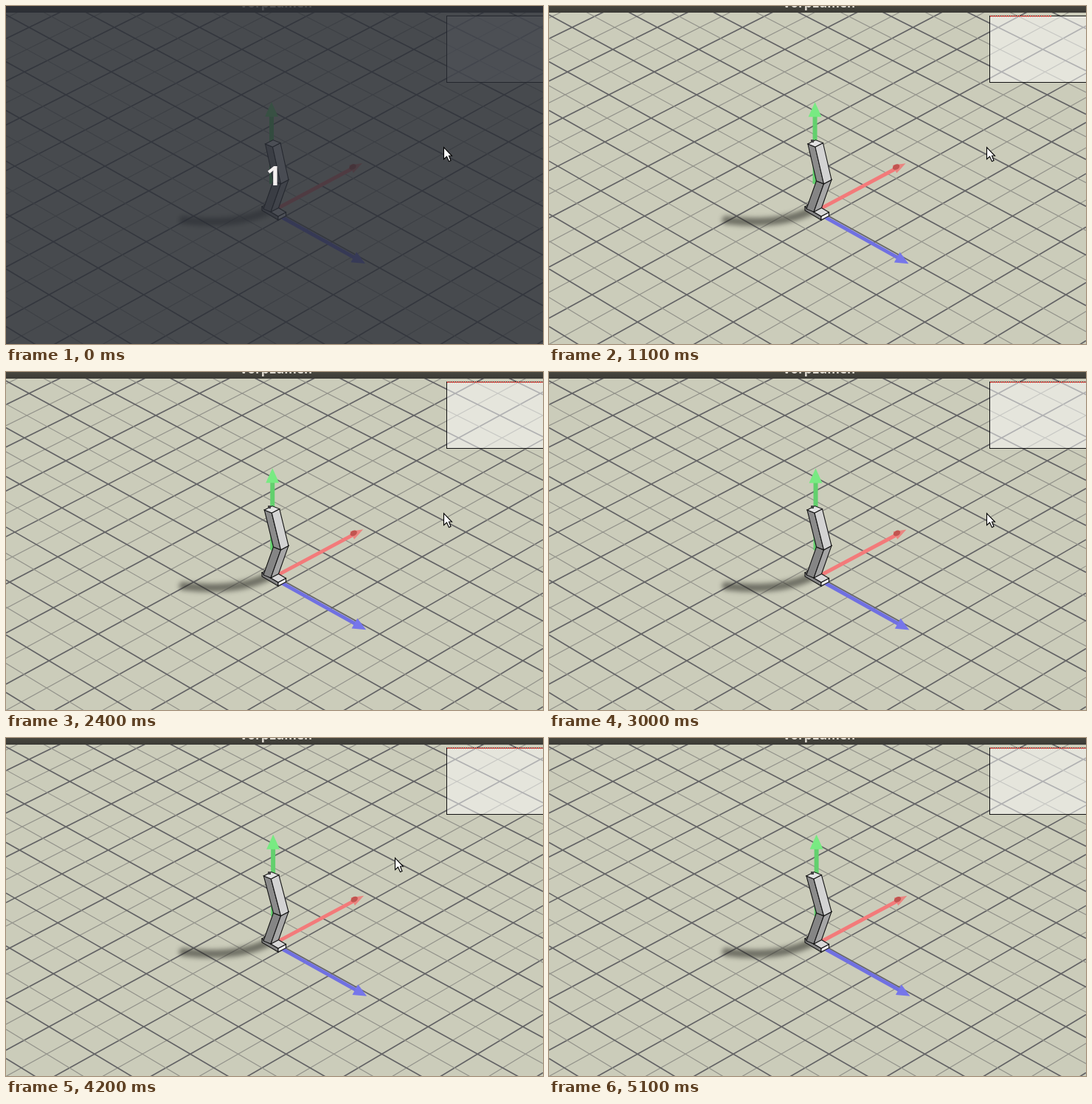
Write an HTML page with a canvas that moves like this. It is 728x458 px and loops after 5.2 s.

```html
<!DOCTYPE html>
<html>
<head>
<meta charset="utf-8">
<style>
  html, body { margin: 0; width: 100%; height: 100%; overflow: hidden; background: #cbccba; }
  canvas { display: block; }
</style>
</head>
<body>
<canvas id="stage" width="728" height="458"></canvas>
<script>
const W = 728, H = 458, LOOP = 5200, STEP = 100;
const HORIZON = -3200, VANISH = 6300;
const ctx = document.getElementById('stage').getContext('2d');
const add = (p, q) => [p[0] + q[0], p[1] + q[1]];

function path(points) {
  ctx.beginPath();
  for (const p of points) ctx.lineTo(...p);
}

function line(color, width, ...points) {
  path(points);
  ctx.strokeStyle = color;
  ctx.lineWidth = width;
  ctx.stroke();
}

function shape(fill, points, edge) {
  path(points);
  ctx.closePath();
  ctx.fillStyle = fill;
  ctx.fill();
  if (!edge) return;
  ctx.strokeStyle = edge;
  ctx.lineWidth = 1.1;
  ctx.stroke();
}

// Evenly spaced parallel ground lines in perspective; every second one is strong.
function gridLines(side, middle) {
  for (let n = -18; n <= 18; n++) {
    const y = HORIZON + 1 / (1 / (middle - HORIZON) - n * 2.84e-6);
    const rise = side * (y - HORIZON) / VANISH * W / 2;
    const strong = n % 2 === 0;
    line(strong ? '#636365' : '#93938b', strong ? 1.7 : 1.2, [0, y + rise], [W, y - rise]);
  }
}

function ground() {
  ctx.fillStyle = '#cbccba';
  ctx.fillRect(0, 0, W, H);
  gridLines(1, 225);
  gridLines(-1, 209);
}

function shadow() {
  ctx.save();
  ctx.filter = 'blur(3px)';
  ctx.lineCap = 'round';
  ctx.beginPath();
  ctx.moveTo(240, 290);
  ctx.quadraticCurveTo(312, 299, 358, 276);
  ctx.strokeStyle = 'rgba(35,35,30,.55)';
  ctx.lineWidth = 11;
  ctx.stroke();
  ctx.restore();
}

function arrow(from, to, width, headLength, headWidth, shaft, head) {
  const dx = to[0] - from[0], dy = to[1] - from[1], length = Math.hypot(dx, dy);
  ctx.save();
  ctx.translate(...from);
  ctx.rotate(Math.atan2(dy, dx));
  const neck = length - headLength;
  line(shaft, width, [0, 0], [neck + 1, 0]);
  shape(head, [[neck, -headWidth / 2], [length, 0], [neck, headWidth / 2]]);
  ctx.restore();
}

function axes(drift) {
  ctx.save();
  ctx.translate(drift, drift * 0.3);
  arrow([360, 241], [360, 130], 6, 20, 18, '#62d06d', '#78ea82');
  arrow([361, 278], [483, 213], 5, 17, 12, '#f37a7a', '#ea8580');
  ctx.fillStyle = '#c25450';
  ctx.beginPath();
  ctx.ellipse(470, 218, 5, 3.5, -0.5, 0, 7);
  ctx.fill();
  arrow([361, 279], [487, 349], 5, 18, 16, '#7070e2', '#7676ea');
  ctx.restore();
}

// A prism seen at its front edge, which runs from top to bottom.
function prism(top, bottom, left, right, shades) {
  const ink = '#151515';
  const [dark, light, lid] = shades;
  shape(dark, [top, bottom, add(bottom, left), add(top, left)], ink);
  shape(light, [top, bottom, add(bottom, right), add(top, right)], ink);
  shape(lid, [top, add(top, left), add(add(top, left), right), add(top, right)], ink);
}

function leg(drift) {
  const left = [-10, -4], right = [10.5, -5.5];
  const hip = [361.5 - drift, 191], knee = [372.5, 241], ankle = [359, 279];
  prism([369, 285], [369, 290], [-22, -13], right, ['#858585', '#eeeeee', '#d8d8d8']);
  prism(knee, ankle, left, right, ['#858585', '#a6a6a6', '#d6d6d6']);
  prism(hip, knee, left, right, ['#8b8b8b', '#d3d3d3', '#e2e2e2']);
  if (drift > 0.4) {
    ctx.fillStyle = '#444';
    ctx.fillRect(355, 181, 4, 4);
  }
}

function chart(t) {
  ctx.fillStyle = 'rgba(255,255,255,.5)';
  ctx.fillRect(598, 13, 130, 90);
  ctx.strokeStyle = '#111';
  ctx.lineWidth = 1;
  ctx.strokeRect(597.5, 13.5, 140, 90);
  if (t <= 200) return;
  ctx.setLineDash([2, 1]);
  line('#e8352c', 1.5, [598, 13.8], [598 + (t - 150) * 0.0875, 13.8]);
  ctx.setLineDash([]);
}

function label(text, x, y, size, color) {
  ctx.fillStyle = color;
  ctx.font = `bold ${size}px "Open Sans", sans-serif`;
  ctx.textAlign = 'center';
  ctx.fillText(text, x, y);
}

function titleBar() {
  const shade = ctx.createLinearGradient(0, 0, 0, 9);
  shade.addColorStop(0, '#48473f');
  shade.addColorStop(1, '#3b3a35');
  ctx.fillStyle = shade;
  ctx.fillRect(0, 0, W, 9);
  label('VorpLumen', 366, 1.5, 17, '#dfdbd2');
}

function countdown() {
  ctx.fillStyle = 'rgba(41,45,54,.81)';
  ctx.fillRect(0, 0, W, H);
  label('1', 363, 243, 36, '#f4f0f0');
}

function cursor(t) {
  const k = Math.max(0, (t - 4000) / 200) ** 2;
  ctx.save();
  ctx.translate(593.5 - 66 * k, 191.5 - 29 * k);
  shape('#fff', [[0, 0], [0, 16], [4, 12.5], [7, 19], [9.5, 18], [7, 11.5], [11, 11.5]], '#000');
  ctx.restore();
}

function draw(now) {
  const t = Math.floor(now % LOOP / STEP) * STEP;
  const drift = 2.6 * t / 5100;
  ground();
  shadow();
  axes(drift);
  leg(drift);
  chart(t);
  titleBar();
  if (t < 200) countdown();
  cursor(t);
  requestAnimationFrame(draw);
}
requestAnimationFrame(draw);
</script>
</body>
</html>
```
